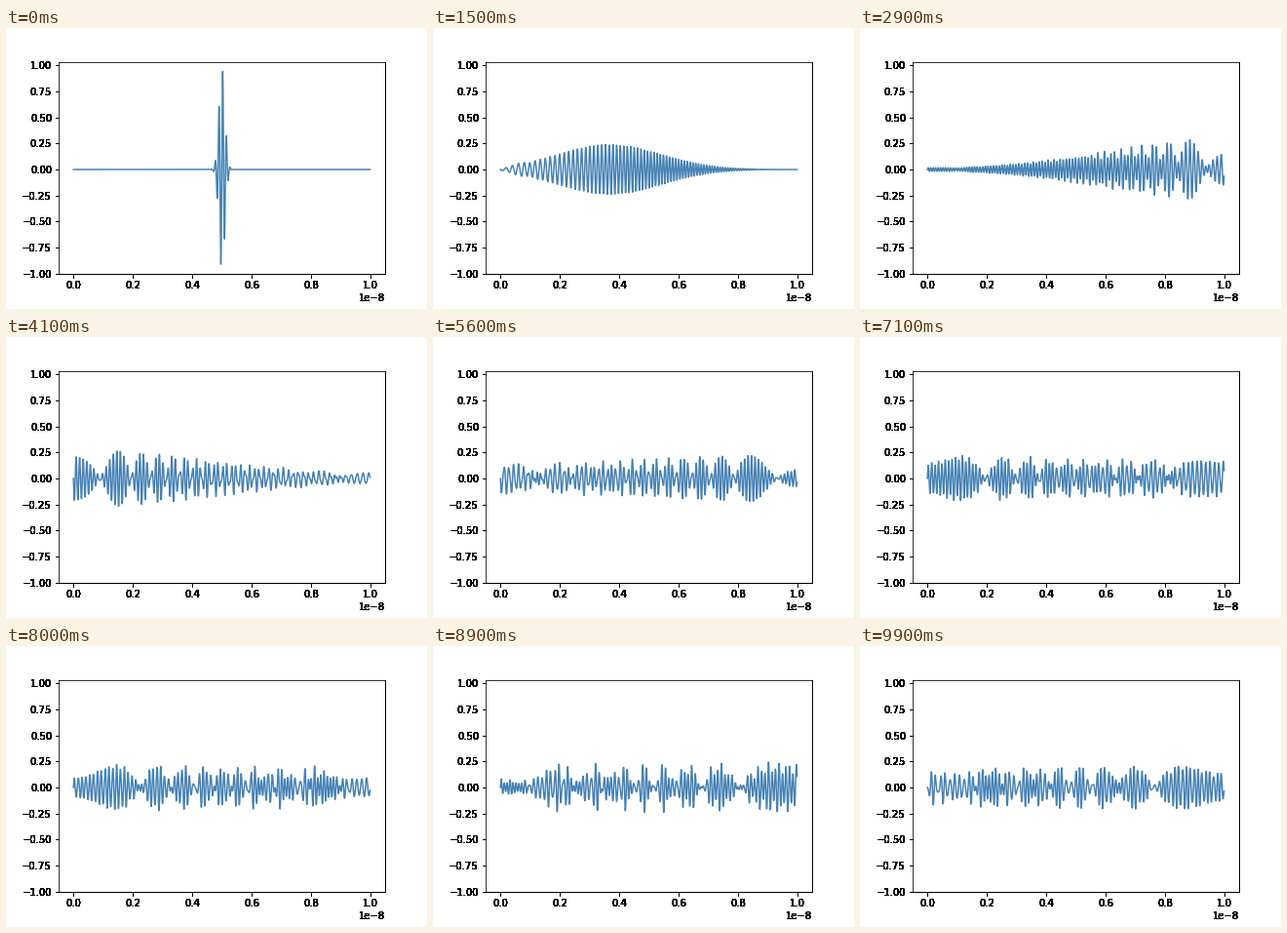
Write a matplotlib script that moves like this. It is 432x288 px and loops after 10 s.

```python
import numpy as np
import matplotlib.pyplot as plt
from matplotlib.animation import FuncAnimation

# Electron wave packet in a box, solved with the spectral method
HBAR = 1.0546e-34
MASS = 9.109e-31
L = 1e-8
N = 1000
X0, SIGMA, KAPPA = L / 2, 1e-10, 5e10
DT = 1e-16  # time per frame
FRAMES = 100

x = np.arange(N) * L / N
psi0 = np.exp(-(x - X0) ** 2 / (2 * SIGMA ** 2) + 1j * KAPPA * x)
psi0[0] = 0

k = np.arange(1, N)
modes = np.sin(np.pi * np.outer(np.arange(N), k) / N)
coeffs = 2 / N * modes.T @ psi0
omega = np.pi ** 2 * HBAR * k ** 2 / (2 * MASS * L ** 2)


def wave(frame):
    return modes @ (coeffs * np.exp(1j * omega * DT * frame)).real


def harden(img, dpi):
    """Make soft edges nearly solid black, as if overdrawn many times."""
    img[..., :3] = 0
    img[..., 3] = 1 - (1 - img[..., 3]) ** 30
    return img, 0, 0


plt.rcParams.update({"font.family": "DejaVu Sans", "font.size": 10})
fig = plt.figure(figsize=(6, 4), dpi=72)
fig.subplots_adjust(left=0.125, right=0.9, bottom=0.125, top=0.88)
ax = fig.add_subplot()
line, = ax.plot(x, wave(0), color="steelblue", lw=1.5)
ax.set(xlim=ax.get_xlim(), ylim=ax.get_ylim())

for part in (ax.xaxis, ax.yaxis, ax.spines.right, ax.spines.bottom):
    part.set_agg_filter(harden)


def update(frame):
    line.set_ydata(wave(frame))
    return line,


anim = FuncAnimation(fig, update, frames=FRAMES, interval=100,
                     repeat=True, repeat_delay=0)
plt.show()
```
